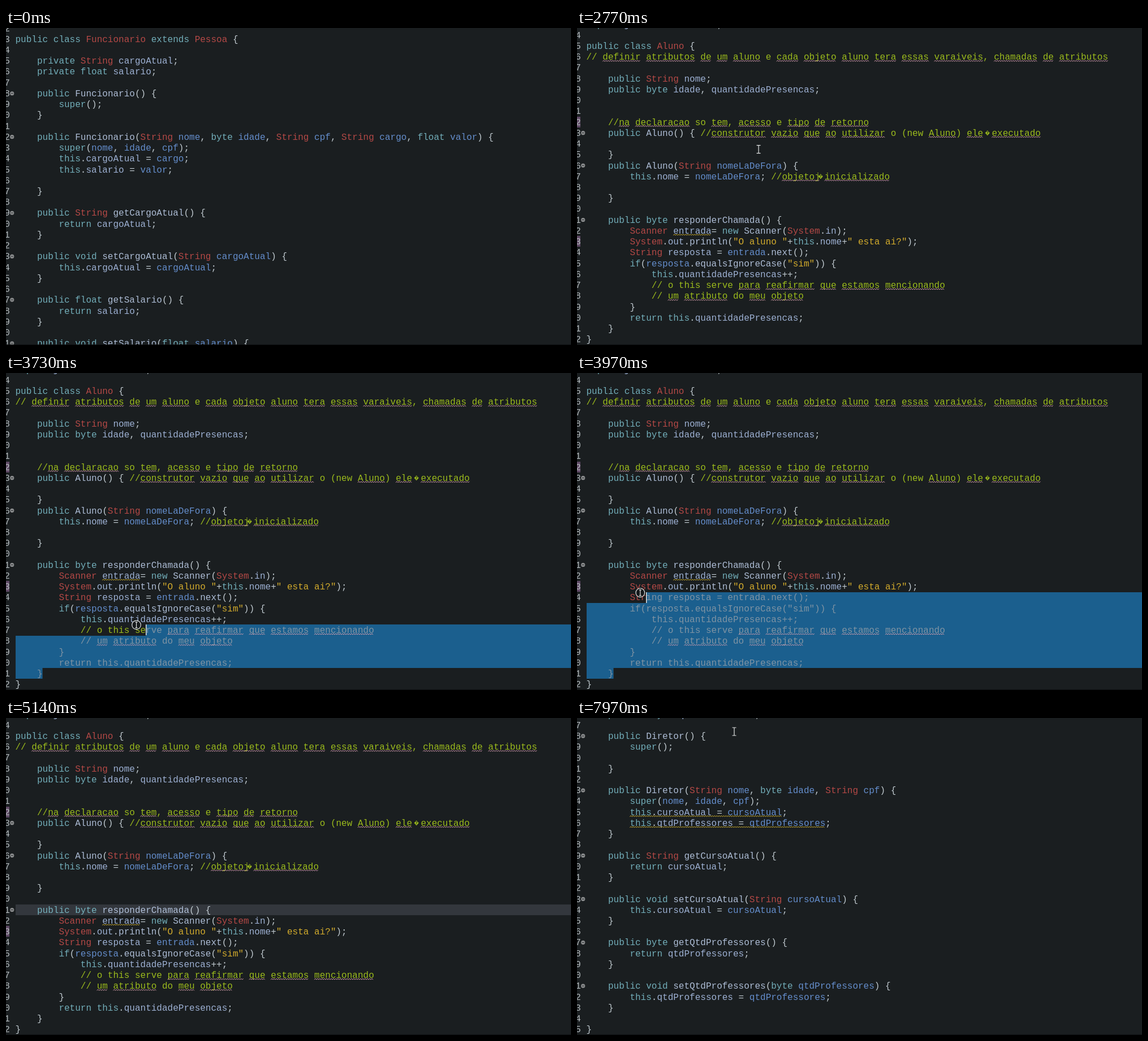
An HTML page with a canvas that plays this animation: 999 px wide and 561 px high, repeating every 8 s.

```html
<!DOCTYPE html>
<html lang="pt">
<head>
<meta charset="utf-8">
<title>Editor</title>
<style>
html, body { margin: 0; width: 100%; height: 100%; overflow: hidden; background: #1a1e20; }
canvas { display: block; }
</style>
</head>
<body>
<canvas id="stage" width="999" height="561"></canvas>
<script>
const W = 999, H = 561, LOOP = 8000;
const LEFT = 16.5, CHAR = 9.61, ROW = 19.23, BASE = 14.8;
const FONT = '16.02px "Courier New", "Liberation Mono", monospace';
const INK = 0.87; // softens the strokes to a thin typeface
const COLOR = {
  back: '#1a1e20', keyword: '#7fc3d0', type: '#cb4f4c', field: '#b1c7ee', param: '#6f9ee6',
  name: '#c3d5f0', punct: '#d8e2e8', comment: '#afd21c', string: '#efc12e',
  number: '#b4babd', select: '#1b5f8e', dim: '#8e9ba6', current: '#33373d',
  warning: '#d8b62c', spelling: '#d9a0b0', beam: '#e2e4e4'
};
const KEYWORDS = new Set(('public private class extends float byte void return super this new if import').split(' '));
const ENGLISH = new Set(['so', 'do', 'this', 'serve', 'new']);

// Tildes enclose a part with a warning underline.
const funcionario = `

public class Funcionario extends Pessoa {

    private String cargoAtual;
    private float salario;

    public Funcionario() {
        super();
    }

    public Funcionario(String nome, byte idade, String cpf, String cargo, float valor) {
        super(nome, idade, cpf);
        this.cargoAtual = cargo;
        this.salario = valor;

    }

    public String getCargoAtual() {
        return cargoAtual;
    }

    public void setCargoAtual(String cargoAtual) {
        this.cargoAtual = cargoAtual;
    }

    public float getSalario() {
        return salario;
    }

    public void setSalario(float salario) {`;

const aluno = `

import java.util.Scanner;

public class Aluno {
// definir atributos de um aluno e cada objeto aluno tera essas varaiveis, chamadas de atributos

    public String nome;
    public byte idade, quantidadePresencas;


    //na declaracao so tem, acesso e tipo de retorno
    public Aluno() { //construtor vazio que ao utilizar o (new Aluno) ele\uFFFDexecutado

    }
    public Aluno(String nomeLaDeFora) {
        this.nome = nomeLaDeFora; //objetoj\uFFFDinicializado

    }

    public byte responderChamada() {
        Scanner ~entrada~= new Scanner(System.in);
        System.out.println("O aluno "+this.nome+" esta ai?");
        String resposta = entrada.next();
        if(resposta.equalsIgnoreCase("sim")) {
            this.quantidadePresencas++;
            // o this serve para reafirmar que estamos mencionando
            // um atributo do meu objeto
        }
        return this.quantidadePresencas;
    }
}`;

const diretor = `

public class Diretor extends Pessoa {

    private String cursoAtual;
    private byte qtdProfessores;

    public Diretor() {
        super();

    }

    public Diretor(String nome, byte idade, String cpf) {
        super(nome, idade, cpf);
        ~this.cursoAtual = cursoAtual~;
        ~this.qtdProfessores = qtdProfessores~;
    }

    public String getCursoAtual() {
        return cursoAtual;
    }

    public void setCursoAtual(String cursoAtual) {
        this.cursoAtual = cursoAtual;
    }

    public byte getQtdProfessores() {
        return qtdProfessores;
    }

    public void setQtdProfessores(byte qtdProfessores) {
        this.qtdProfessores = qtdProfessores;
    }

}`;

const ctx = document.getElementById('stage').getContext('2d');
const colX = col => LEFT + col * CHAR;

function wordColor(word, before, after) {
  if (KEYWORDS.has(word)) return COLOR.keyword;
  const called = after[0] === '(';
  if (/^[A-Z]/.test(word) && !called && !before.endsWith('.')) return COLOR.type;
  if (called) return COLOR.name;
  if (/[(=]/.test(before) && !before.endsWith('.')) return COLOR.param;
  return COLOR.field;
}

function parseLine(raw) {
  const parts = raw.split('~');
  const text = parts.join('');
  const line = { text, tokens: [], waves: [], fold: /^    public .*\{/.test(text) };
  if (parts.length > 1) {
    const from = parts[0].length;
    line.waves.push([colX(from), colX(from + parts[1].length), COLOR.warning]);
  }
  const found = text.match(/\/\/.*$|"[^"]*"|\w+|[^\s\w"\/]+|\s+/g) || [];
  let col = 0;
  for (const part of found) {
    const before = text.slice(0, col), after = text.slice(col + part.length);
    if (part.startsWith('//')) parseComment(line, part, colX(col));
    else if (part.trim()) {
      const color = part[0] === '"' ? COLOR.string
        : /\w/.test(part[0]) ? wordColor(part, before, after) : COLOR.punct;
      line.tokens.push({ x: colX(col), text: part, color });
    }
    col += part.length;
  }
  return line;
}

function parseComment(line, comment, x) {
  for (const part of comment.match(/\uFFFD|[a-z]+|[^a-z\uFFFD]+/gi)) {
    let width = part.length * CHAR;
    if (part === '\uFFFD') {
      const tight = line.tokens[line.tokens.length - 1].text.endsWith('j');
      width = tight ? 8 : 15.4;
      line.tokens.push({ x: x + (tight ? 1 : 7.7), text: part, color: COLOR.comment });
    } else {
      line.tokens.push({ x, text: part, color: COLOR.comment });
      if (/^[a-z]{2,}$/i.test(part) && !ENGLISH.has(part)) {
        line.waves.push([x, x + width, COLOR.spelling]);
      }
    }
    x += width;
  }
}

const makeView = (source, top, changed = []) => ({ lines: source.split('\n').map(parseLine), top, changed });
const views = {
  funcionario: makeView(funcionario, -28.5),
  aluno: makeView(aluno, -54.7, [12, 23]),
  diretor: makeView(diretor, -28.5)
};

// Pointer tracks: time, x, y
const tracks = [
  [[890, 97, 18], [1100, 130, 42], [1400, 225, 103], [1610, 283, 133], [1670, 292, 137],
   [2010, 301, 140], [2570, 301, 140], [2750, 318, 200], [3050, 362, 410], [3260, 366, 531],
   [3320, 366, 531], [3370, 362, 522], [3490, 347, 504], [3620, 290, 476], [3900, 140, 400],
   [3970, 112, 389], [4190, 70, 349], [4280, 58, 341], [4550, 58, 341], [4750, 75, 240],
   [5020, 125, 36], [5140, 134, -12]],
  [[6380, 150, -6], [6520, 205, 85], [6720, 300, 270], [6850, 315, 308], [6910, 315, 310],
   [7040, 316, 310], [7400, 316, 310], [7470, 316, 309], [7710, 316, 308], [7820, 302, 180],
   [7970, 278, 24], [8000, 278, 24]]
];

function pointerAt(t) {
  const track = tracks.find(p => t >= p[0][0] && t <= p[p.length - 1][0]);
  if (!track) return null;
  const i = Math.max(1, track.findIndex(p => p[0] >= t));
  const [t0, x0, y0] = track[i - 1], [t1, x1, y1] = track[i];
  const k = (t - t0) / (t1 - t0);
  return { x: x0 + (x1 - x0) * k, y: y0 + (y1 - y0) * k };
}

const DRAG = 3290, RELEASE = 4300, CLEAR = 4550, CARET_OFF = 5050;
const ANCHOR = { line: 31, col: 5 };

function caretAt(t, view) {
  if (t < DRAG || t >= CARET_OFF) return null;
  if (t >= CLEAR) return { line: 21, col: 4 };
  const p = pointerAt(t - 30);
  const line = Math.min(ANCHOR.line, Math.floor((p.y - view.top) / ROW) + 1);
  const col = Math.round((p.x - LEFT) / CHAR);
  return { line, col: Math.min(col, view.lines[line - 1].text.length) };
}

function selectionRects(caret, rowTop) {
  const rects = [];
  for (let n = caret.line; n <= ANCHOR.line; n++) {
    const x = n === caret.line ? colX(caret.col) : 17;
    const right = n === ANCHOR.line ? colX(ANCHOR.col) : W;
    const y = Math.round(rowTop(n));
    rects.push([x, y, right - x, Math.round(rowTop(n + 1)) - y]);
  }
  return rects;
}

function drawUnknown(x, y, color) {
  ctx.fillStyle = color;
  ctx.beginPath();
  ctx.moveTo(x, y - 9.5);
  ctx.lineTo(x + 4, y - 5);
  ctx.lineTo(x, y - 0.5);
  ctx.lineTo(x - 4, y - 5);
  ctx.fill();
  ctx.fillStyle = COLOR.back;
  ctx.font = 'bold 7px "DejaVu Sans", sans-serif';
  ctx.fillText('?', x - 2, y - 2.5);
  ctx.font = FONT;
}

function drawCode(view, rowTop, override) {
  ctx.globalAlpha = INK;
  view.lines.forEach((line, i) => {
    const y = rowTop(i + 1) + BASE;
    if (y < -10 || y > H + 15) return;
    for (const { x, text, color } of line.tokens) {
      if (text === '\uFFFD') drawUnknown(x, y, override || color);
      else {
        ctx.fillStyle = override || color;
        ctx.fillText(text, x, y);
      }
    }
  });
  ctx.globalAlpha = 1;
}

function drawWave(x, right, y, color) {
  ctx.strokeStyle = color;
  ctx.lineWidth = 1;
  ctx.beginPath();
  for (let k = 0; x + k * 2 <= right; k++) ctx.lineTo(x + k * 2, y + (k % 2 ? 0 : 2));
  ctx.stroke();
}

function drawGutter(view, rowTop) {
  view.lines.forEach((line, i) => {
    const n = i + 1, top = rowTop(n), mid = top + ROW / 2;
    if (view.changed.includes(n)) {
      ctx.fillStyle = '#604b66';
      ctx.fillRect(0, Math.round(top), 6, 19);
    }
    ctx.fillStyle = COLOR.number;
    ctx.fillText(n % 10, -2.8, top + BASE);
    if (!line.fold) return;
    ctx.fillStyle = '#8b8d8e';
    ctx.beginPath();
    ctx.arc(10.7, mid, 3.6, 0, 7);
    ctx.fill();
    ctx.fillStyle = '#25292b';
    ctx.fillRect(8.7, mid - 0.5, 4, 1);
  });
}

function drawPointer({ x, y }, ring) {
  ctx.lineWidth = 1.2;
  ctx.strokeStyle = COLOR.beam;
  if (ring) {
    ctx.fillStyle = '#15191b';
    ctx.beginPath();
    ctx.arc(x, y, 7.8, 0, 7);
    ctx.fill();
    ctx.stroke();
  }
  const h = ring ? 5 : 7, w = ring ? 2 : 3.5;
  ctx.beginPath();
  ctx.moveTo(x - w, y - h);
  ctx.lineTo(x + w, y - h);
  ctx.moveTo(x, y - h);
  ctx.lineTo(x, y + h);
  ctx.moveTo(x - w, y + h);
  ctx.lineTo(x + w, y + h);
  ctx.stroke();
}

function draw(t) {
  const view = t < 430 ? views.funcionario : t < 5700 ? views.aluno : views.diretor;
  const scroll = t < 6950 ? 0 : t < 7010 ? 3 * ROW : 83.8;
  const shift = view === views.diretor ? scroll : 0;
  const rowTop = n => view.top - shift + (n - 1) * ROW;
  const caret = caretAt(t, view);
  const selecting = caret && t < CLEAR && caret.line < ANCHOR.line;
  const rects = selecting ? selectionRects(caret, rowTop) : [];

  ctx.fillStyle = COLOR.back;
  ctx.fillRect(0, 0, W, H);
  ctx.font = FONT;

  const current = t >= CLEAR && t < 5700 ? 21 : caret && !selecting ? ANCHOR.line : 0;
  if (current) {
    ctx.fillStyle = COLOR.current;
    ctx.fillRect(17, Math.round(rowTop(current)), W, 19);
  }
  drawGutter(view, rowTop);
  drawCode(view, rowTop);

  if (selecting) {
    ctx.save();
    ctx.beginPath();
    rects.forEach(r => ctx.rect(...r));
    ctx.clip();
    ctx.fillStyle = COLOR.select;
    ctx.fillRect(0, 0, W, H);
    drawCode(view, rowTop, COLOR.dim);
    ctx.restore();
  }
  view.lines.forEach((line, i) => {
    for (const [x, right, color] of line.waves) drawWave(x, right, rowTop(i + 1) + 15.8, color);
  });
  if (caret) {
    ctx.fillStyle = COLOR.beam;
    ctx.fillRect(Math.round(colX(caret.col)), Math.round(rowTop(caret.line)), 1.5, 19);
  }
  ctx.fillStyle = '#0e1011';
  ctx.fillRect(0, H - 1, W, 1);

  const pointer = pointerAt(t);
  if (pointer) drawPointer(pointer, t >= DRAG && t < RELEASE);
}

const start = performance.now();
function tick() {
  draw((performance.now() - start) % LOOP);
  requestAnimationFrame(tick);
}
tick();
</script>
</body>
</html>
```
